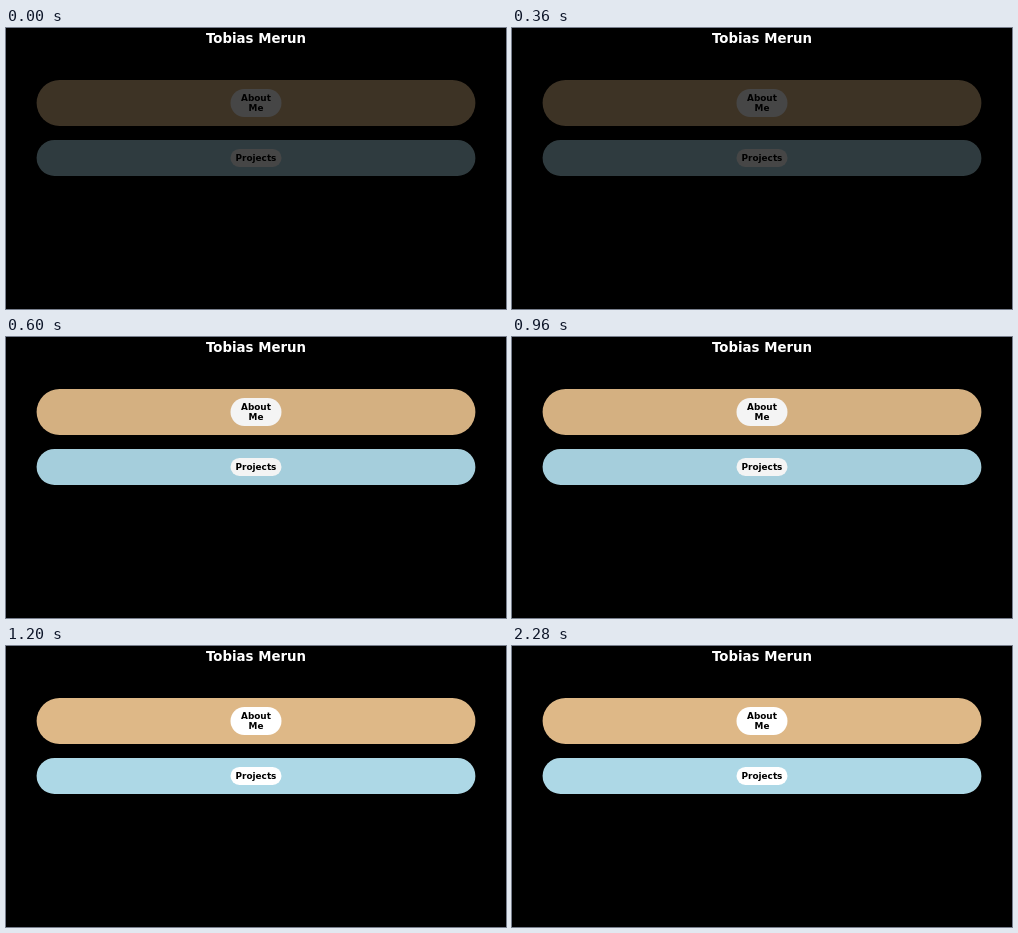
These frames come from a looping animation (500x281 px, 3 s). An HTML page:

```html
<!DOCTYPE html>
<html lang="en">
<head>
<meta charset="utf-8">
<title>Portfolio</title>
<style>
  html, body { margin: 0; width: 100%; height: 100%; overflow: hidden; background: #000; }
  svg { display: block; width: 100vw; height: 100vh; }
  text { font: bold 8.89px "DejaVu Sans", sans-serif; text-anchor: middle; }
  .name { font-size: 13.33px; fill: #fff; }
  .pill { fill: #fff; }
</style>
</head>
<body>
<svg viewBox="0 0 500 281" preserveAspectRatio="none">
  <text class="name" x="250" y="15.3">Tobias Merun</text>
  <g id="cards">
    <rect x="30.6" y="52" width="438.8" height="46" rx="23" fill="#deb887"/>
    <rect class="pill" x="224.5" y="61" width="51" height="28" rx="13.9"/>
    <text x="250" y="73">About</text>
    <text x="250" y="83.3">Me</text>
    <rect x="30.6" y="112" width="438.8" height="35.9" rx="17.95" fill="#add8e6"/>
    <rect class="pill" x="224.5" y="121" width="51" height="17.9" rx="8.95"/>
    <text x="250" y="133.1">Projects</text>
  </g>
</svg>
<script>
  const LOOP = 3000;
  // [start in ms, opacity]
  const steps = [[0, 0.277], [600, 0.96], [1200, 1], [LOOP, 1]];

  document.getElementById("cards").animate(
    steps.map(([at, opacity]) => ({ offset: at / LOOP, opacity, easing: "step-end" })),
    { duration: LOOP, iterations: Infinity }
  );
</script>
</body>
</html>
```
